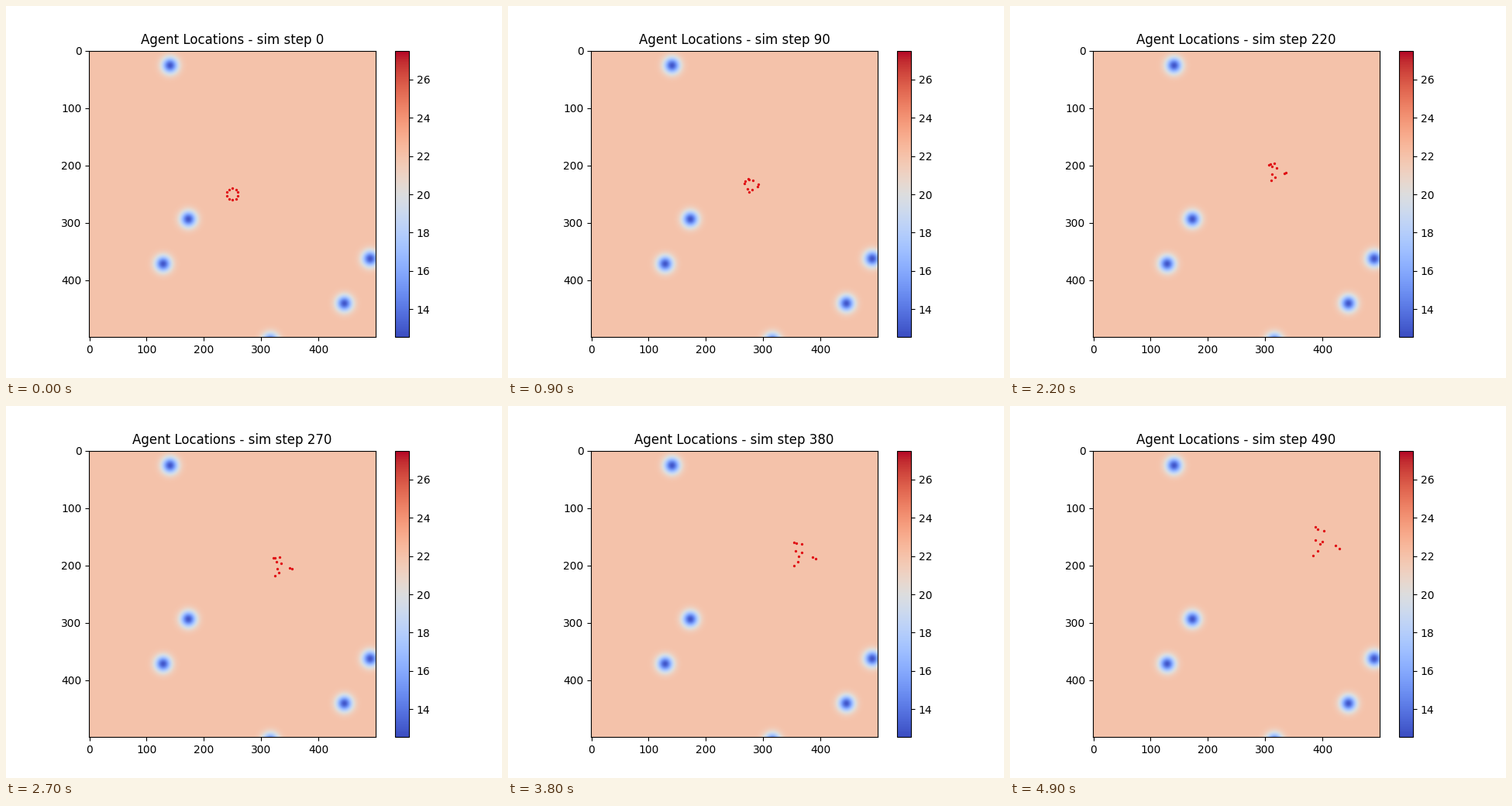
Recreate the animation shown at these times as a matplotlib script. Size 640 px wide and 480 px high, loop 5000 ms.

```python
import numpy as np
import matplotlib.pyplot as plt
from matplotlib.animation import FuncAnimation

SIZE = 500
AMBIENT = 22.0
FRAMES = 50
INTERVAL = 100
STEPS_PER_FRAME = 10

# Cold spots share one Gaussian profile; two lie close to the grid's border
SPOT_CENTERS = [(141, 26), (173, 294), (129, 372), (490, 363), (445, 441), (316, 507)]
SPOT_DEPTH = 9.1
SPOT_SIGMA = 9.5

RING_CENTER = 250
RING_RADIUS = 10
# Where each agent's straight run ends, clockwise from the top of the ring
GOALS = [(388, 156), (399, 158), (430, 171), (423, 165), (391, 175),
         (384, 183), (396, 163), (387, 133), (392, 137), (403, 140)]


def temperature_field():
    y, x = np.mgrid[:SIZE, :SIZE]
    dips = [np.exp(-((x - cx) ** 2 + (y - cy) ** 2) / (2 * SPOT_SIGMA ** 2))
            for cx, cy in SPOT_CENTERS]
    return AMBIENT - SPOT_DEPTH * sum(dips)


def starting_ring(count):
    angle = 2 * np.pi * np.arange(count) / count
    return RING_CENTER + RING_RADIUS * np.column_stack([np.sin(angle), -np.cos(angle)])


goals = np.array(GOALS)
starts = starting_ring(len(goals))


def positions(frame):
    progress = frame / (FRAMES - 1)
    return starts + progress * (goals - starts)


fig, ax = plt.subplots(figsize=(6.4, 4.8), dpi=100)
image = ax.imshow(temperature_field(), cmap="coolwarm", vmin=12.55, vmax=27.5)
fig.colorbar(image, ax=ax)
agents, = ax.plot([], [], "o", color="#e00c12", markersize=2.4, markeredgewidth=0)
title = ax.set_title("")


def update(frame):
    agents.set_data(*positions(frame).T)
    title.set_text(f"Agent Locations - sim step {frame * STEPS_PER_FRAME}")
    return agents, title


anim = FuncAnimation(fig, update, frames=FRAMES, interval=INTERVAL,
                     repeat=True, repeat_delay=0)
plt.show()
```
